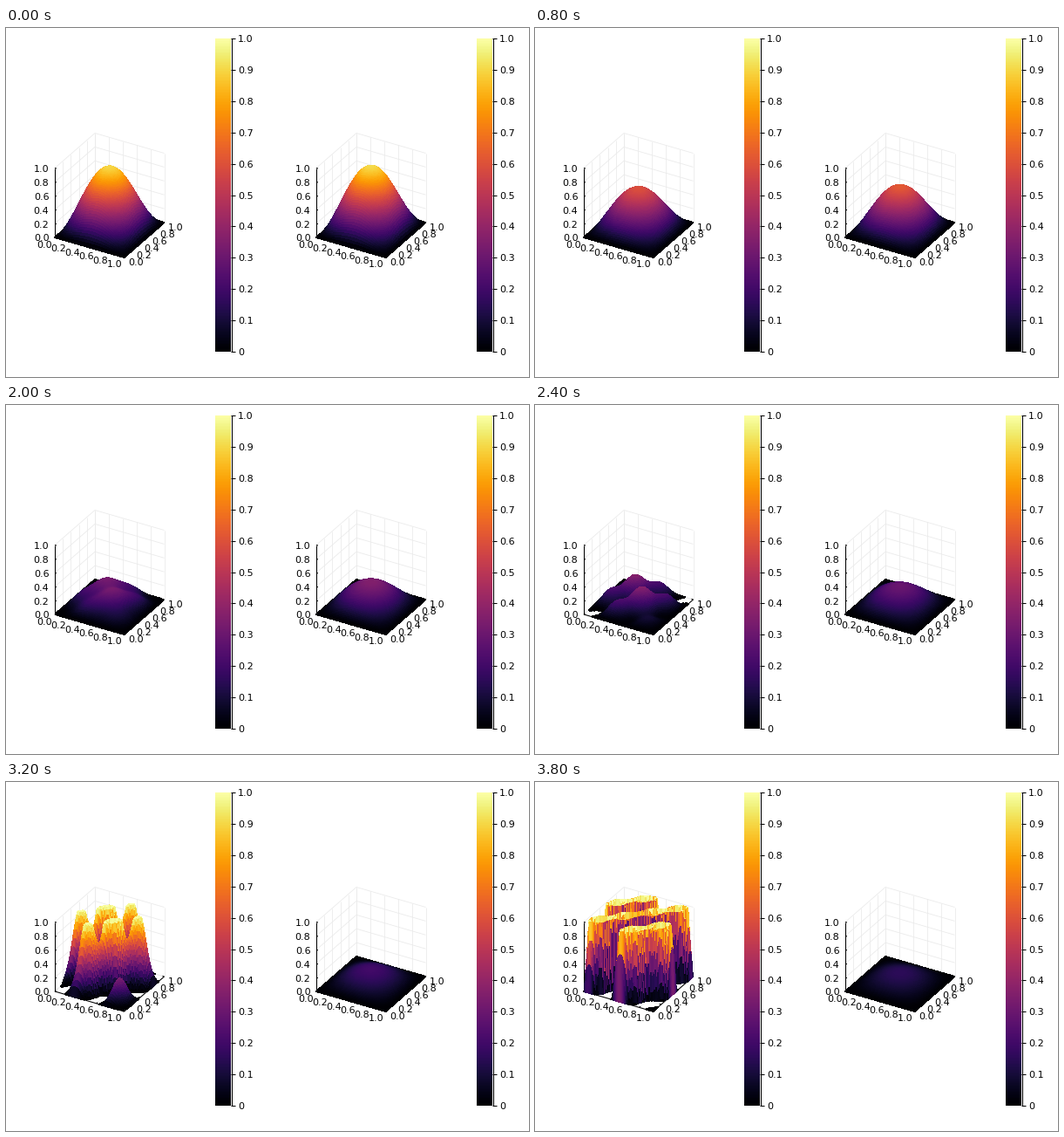
A matplotlib script for the animation above (4000 ms loop, 600x400 px).

```python
import numpy as np
import matplotlib
import matplotlib.pyplot as plt
from matplotlib.animation import FuncAnimation
from matplotlib.collections import LineCollection, PolyCollection

W, H, DPI = 600, 400, 100
FRAMES, INTERVAL = 20, 200
N = 76
DT = 0.005
RATE = 2 * np.pi**2 * DT
CMAP = matplotlib.colormaps["inferno"]
TICKS = np.linspace(0, 1, 6)

plt.rcParams["font.family"] = "DejaVu Sans"
fig = plt.figure(figsize=(W / DPI, H / DPI), dpi=DPI, facecolor="white")
ax = fig.add_axes([0, 0, 1, 1])
ax.set(xlim=(0, W), ylim=(H, 0))
ax.axis("off")


def project(x, y, z, left=0):
    """Orthographic view of the unit cube in stage pixels."""
    return np.stack([left + 56 + 79.5 * x + 46 * y,
                     240 + 23 * x - 40 * y - 79.5 * z], axis=-1)


def lines(segments, color, width, order):
    ax.add_collection(LineCollection(segments, colors=color, linewidths=width,
                                     zorder=order))


def label(x, y, text, ha):
    ax.text(x, y, text, fontsize=8, ha=ha, va="center_baseline", zorder=5)


def seg(a, b, left):
    return [project(*a, left), project(*b, left)]


def draw_box(left):
    grid = []
    for t in TICKS:
        grid += [seg((0, t, 0), (0, t, 1), left), seg((t, 1, 0), (t, 1, 1), left),
                 seg((0, 0, t), (0, 1, t), left), seg((0, 1, t), (1, 1, t), left),
                 seg((t, 0, 0), (t, 1, 0), left), seg((0, t, 0), (1, t, 0), left)]
    lines(grid, "#ebebeb", 0.6, 1)
    axes = [seg((0, 0, 0), (0, 0, 1), left), seg((0, 0, 0), (1, 0, 0), left),
            seg((1, 0, 0), (1, 1, 0), left)]
    for t in TICKS:
        axes += [seg((0, 0, t), (0.025, 0, t), left),
                 seg((t, 0, 0), (t, 0.03, 0), left),
                 seg((1, t, 0), (0.975, t, 0), left)]
        text = f"{t:.1f}"
        label(left + 49.5, 240.5 - 79.5 * t, text, "right")
        label(left + 53 + 80.5 * t, 247.5 + 23 * t, text, "right")
        label(left + 140 + 45.5 * t, 268.5 - 40 * t, text, "left")
    lines(axes, "black", 0.75, 2)


def draw_colorbar(left):
    x0, x1, top, bottom = left + 240, left + 258, 12, 371
    ramp = np.linspace(1, 0, 256)[:, None]
    ax.imshow(ramp, cmap=CMAP, vmin=0, vmax=1, aspect="auto",
              extent=(x0, x1, bottom, top), zorder=2)
    marks = [[(x1 + 0.5, top), (x1 + 0.5, bottom)]]
    for i in range(11):
        y = bottom + (top - bottom) * i / 10
        marks.append([(x1, y), (x1 + 5, y)])
        label(left + 266, y, f"{i / 10:.1f}" if i else "0", "left")
    lines(marks, "black", 0.75, 3)


u = np.linspace(0, 1, N + 1)
X, Y = np.meshgrid(u, u)
BASE = np.sin(np.pi * X) * np.sin(np.pi * Y)
ENVELOPE = np.sqrt(np.abs(BASE)) * np.cos(np.pi * (X - Y) / 2)
RIPPLE = ENVELOPE * (0.4 * np.cos(4 * np.pi * (X + Y))
                     - np.cos(4 * np.pi * (X - Y)))


def corners(a):
    return np.stack([a[:-1, :-1], a[:-1, 1:], a[1:, 1:], a[1:, :-1]], axis=2)


# Painter's order: far cells first
DEPTH = np.argsort((23 * corners(X) - 40 * corners(Y)).mean(axis=2).ravel(),
                   kind="stable")


def explicit(n):
    """Forward Euler: decays, then an alternating ripple blows up."""
    return (1 - RATE) ** (n + 1) * BASE + 0.121 * (-1.8) ** (n - 12) * 1.0 * RIPPLE


def implicit(n):
    """Backward Euler: decays steadily."""
    return BASE / (1 + RATE) ** (n + 1)


def show(coll, z, left):
    cells = corners(z).reshape(-1, 4)[DEPTH]
    low, high = cells.min(axis=1), cells.max(axis=1)
    keep = (low < 1) & ((high > 1e-9) | (low > -1e-9))
    zc = np.clip(z, 0, 1)
    pts = project(X, Y, zc, left)
    quads = np.stack([corners(pts[..., 0]), corners(pts[..., 1])], axis=-1)
    coll.set_verts(quads.reshape(-1, 4, 2)[DEPTH][keep])
    coll.set_facecolor(CMAP(corners(zc).mean(axis=2).ravel()[DEPTH][keep]))


panels = []
for left, solve in ((0, explicit), (300, implicit)):
    draw_box(left)
    draw_colorbar(left)
    coll = PolyCollection([], edgecolors="face", linewidths=0.6,
                          antialiaseds=False, zorder=4)
    ax.add_collection(coll)
    panels.append((coll, solve, left))
ax.set(xlim=(0, W), ylim=(H, 0))


def update(n):
    for coll, solve, left in panels:
        show(coll, solve(n), left)
    return [p[0] for p in panels]


anim = FuncAnimation(fig, update, frames=FRAMES, interval=INTERVAL,
                     repeat=True, repeat_delay=0, blit=False)
plt.show()
```
